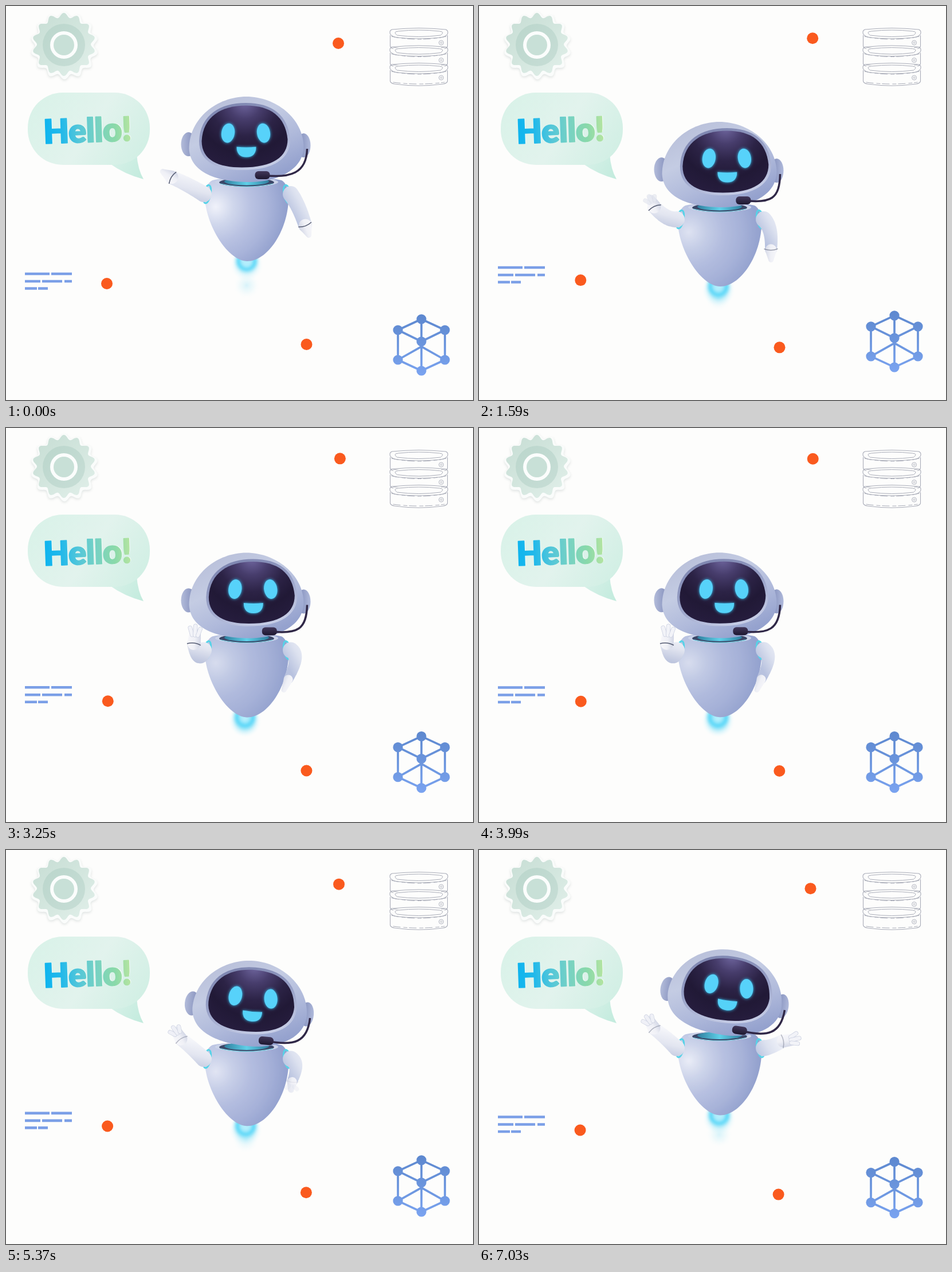
Animation, 815 px wide and 687 px high, one loop 7.13 s. Source, as an HTML page with a canvas:

```html
<!DOCTYPE html>
<html lang="en">
<head>
<meta charset="utf-8">
<title>Hello robot</title>
<style>
html, body { margin: 0; width: 100%; height: 100%; overflow: hidden; background: #fdfdfc; }
canvas { display: block; }
</style>
</head>
<body>
<canvas id="stage" width="815" height="687"></canvas>
<script>
const c = document.getElementById('stage').getContext('2d');
const LOOP = 7130, TAU = Math.PI * 2;

const clamp = v => Math.max(0, Math.min(1, v));
const mix = (a, b, u) => a.map((v, i) => v + (b[i] - v) * u);
function ramp(t, from, to) {
  const u = clamp((t - from) / (to - from));
  return u * u * (3 - 2 * u);
}

// Pose: elbow x, y, wrist x, y, hand x, y, finger spread, cuff line, wrist radius
const leftPoses = {
  wave: [320, 312, 290, 299, 269, 286, 0, 1, 12],
  bent: [337, 352, 328, 317, 332, 283, 1, 1, 12],
  spread: [327, 310, 306, 294, 291, 270, .9, .4, 11.5]
};
const rightPoses = {
  wave: [511, 347, 522, 382, 530, 404, 0, 1, 12],
  bent: [514, 337, 493, 378, 483, 402, 0, 0, 8.5],
  spread: [508, 327, 530, 316, 562, 311, 1, .4, 11.5]
};
const armAt = (poses, fold, unfold) => mix(mix(poses.wave, poses.bent, fold), poses.spread, unfold);

// The robot sinks, hangs, then rises part of the way; the icons share its sway.
function poseAt(t) {
  const body = 59.5 * Math.sin(Math.PI / 2 * clamp(t / 3000)) - 42 * ramp(t, 3900, 6650);
  const lean = ramp(t, 4400, 6100), drift = (t / LOOP) ** 4, fold = ramp(t, 1000, 2300);
  return {
    body,
    headX: 419.5 + 11.5 * lean,
    headY: 231 - 2 * lean + body,
    tilt: .14 * lean,
    faceX: -3 + 14 * ramp(t, 0, 1700) - 9 * ramp(t, 2500, 5200),
    sunk: body / 60,
    left: armAt(leftPoses, fold, ramp(t, 4050, 4800)),
    right: armAt(rightPoses, fold, ramp(t, 4800, 6950)),
    lines: 467 - .25 * body + 3 * drift,
    cube: 546 - .14 * body,
    dots: [
      [580 + .05 * body - 2.5 * drift, 65 - .2 * body + 6 * drift],
      [176 + .03 * body, 484 - .135 * body + 7.3 * drift],
      [524.5 - 2 * drift, 590 + .12 * body + 9 * drift]
    ]
  };
}

function stops(g, colors) {
  colors.forEach((color, i) => g.addColorStop(i / (colors.length - 1), color));
  return g;
}
const linear = (x0, y0, x1, y1, ...colors) => stops(c.createLinearGradient(x0, y0, x1, y1), colors);
const radial = (x, y, r, ...colors) => stops(c.createRadialGradient(x, y, 0, x, y, r), colors);

function fill(path, style) {
  c.fillStyle = style;
  c.fill(new Path2D(path));
}
function stroke(path, style, width) {
  c.strokeStyle = style;
  c.lineWidth = width;
  c.stroke(new Path2D(path));
}
function oval(x, y, rx, ry, style, turn = 0) {
  c.beginPath();
  c.ellipse(x, y, rx, ry, turn, 0, TAU);
  c.fillStyle = style;
  c.fill();
}
function ring(x, y, rx, ry, style, width, turn = 0) {
  c.beginPath();
  c.ellipse(x, y, rx, ry, turn, 0, TAU);
  c.strokeStyle = style;
  c.lineWidth = width;
  c.stroke();
}
function pill(x, y, w, h, r, style) {
  c.beginPath();
  c.roundRect(x, y, w, h, r);
  c.fillStyle = style;
  c.fill();
}
function placed(x, y, turn, draw) {
  c.save();
  c.translate(x, y);
  c.rotate(turn);
  draw();
  c.restore();
}

function cog(radius, depth) {
  const p = new Path2D();
  for (let i = 0; i <= 280; i++) {
    const a = i / 280 * TAU, r = radius + depth * Math.cos(14 * a);
    p.lineTo(r * Math.sin(a), -r * Math.cos(a));
  }
  return p;
}

function gear() {
  placed(102, 69, 0, () => {
    c.save();
    c.shadowColor = '#9aa8a64d';
    c.shadowBlur = 4;
    c.shadowOffsetY = 2;
    fill(cog(55, 4), '#fafcfb');
    c.restore();
    c.translate(-1, -2);
    fill(cog(51, 4), linear(-40, -45, 40, 45, '#c9dfd6', '#d3e6de', '#dfeee8'));
    oval(0, 1, 37, 37, linear(-30, -30, 30, 30, '#bcd7cd', '#c6ddd5'));
    oval(0, 1, 24, 24, '#fbfdfc');
    oval(0, 1, 18, 18, '#c8e0d7');
  });
}

function bubble() {
  fill('M180 274Q206 293 240 302Q230 285 228 258Z', linear(190, 270, 240, 300, '#d5f0e7', '#c2ebdd'));
  pill(38, 151, 213, 126, 61, linear(38, 151, 251, 290, '#d8f2e8', '#e2f3ed', '#cdeee2'));
  placed(66, 240, -.035, () => {
    c.font = '900 58px Lato, "Open Sans", sans-serif';
    c.letterSpacing = '-0.5px';
    c.lineJoin = 'round';
    c.fillStyle = '#f3fbf8';
    c.fillText('Hello!', 2, -1);
    c.fillStyle = c.strokeStyle = linear(0, 0, 156, 0,
      '#0db4ef', '#22b9ea', '#55c7d8', '#78d2c2', '#8ad9a9', '#bbe6a0');
    c.lineWidth = 2;
    c.fillText('Hello!', 0, 0);
    c.strokeText('Hello!', 0, 0);
  });
}

function database() {
  const ink = '#a9acb8';
  for (let i = 0; i < 3; i++) {
    placed(720.5, 48 + i * 30.5, 0, () => {
      fill('M-50 -3Q0 -15 50 -3V25Q49 28 45 28Q0 37 -45 28Q-50 27 -50 24Z', '#fdfdfc');
      stroke('M-47 -7Q0 -12 47 -7Q52 -5 50 1Q46 6 38 7Q0 11 -38 7Q-46 6 -50 1Q-52 -5 -47 -7Z', ink, 1.1);
      stroke('M-38 3Q-46 -3 -36 -4Q0 -8 36 -4Q46 -3 38 3Q0 8 -38 3Z', ink, 1);
      stroke('M-50 3V22Q-49 26 -42 27Q0 33 42 27Q49 26 50 22V3', ink, 1.1);
      c.setLineDash([13, 5, 7, 3]);
      stroke('M-48 5Q0 15 48 5M-45 24Q0 30 45 24', ink, 1);
      c.setLineDash([]);
      ring(39, 16, 4, 4, ink, .9);
      ring(39, 16, 1.5, 1.5, ink, .8);
    });
  }
}

function textLines(y) {
  const rows = ['M33 0H76M79 0H115', 'M33 13H60M63 13H98M102 13H115', 'M33 25.5H54M56 25.5H73'];
  placed(0, y, 0, () => stroke(rows.join(''), '#7b9fe7', 4.6));
}

function cube(y) {
  placed(725, y, 0, () => {
    const ink = linear(0, -8, 0, 98, '#5d88cf', '#6b95dd', '#7aa3f0');
    stroke('M0 0L-41 19V71L0 90L41 71V19ZV39M-41 19L0 39L41 19M-41 71L0 48L41 71M0 48V90', ink, 3.7);
    for (const v of [0, 39, 90]) oval(0, v, 8.6, 8.6, ink);
    for (const x of [-41, 41]) for (const v of [19, 71]) oval(x, v, 8.6, 8.6, ink);
  });
}

function flame({ body, sunk }) {
  const x = 420 - 3 * sunk, y = 443 + body, puff = 487 + body / 2;
  c.globalAlpha = .3;
  oval(x, puff, 24, 24, radial(x, puff, 24, '#7fdcf5', '#b5ebf890', '#ffffff00'));
  c.globalAlpha = .55 + .35 * sunk;
  oval(x, y + 8, 30, 30, radial(x, y + 8, 30, '#35cdf6', '#7fdff7a0', '#ffffff00'));
  c.globalAlpha = 1;
  c.save();
  c.filter = 'blur(3px)';
  ring(x, y + 1, 14, 14, '#54d6f8', 8);
  oval(x, y + 4, 9, 9, '#b4eefc');
  c.restore();
}

function torso({ body, sunk }) {
  placed(0, body, 0, () => {
    const shell = 'M360 304C352 308 347 318 347 335C350 385 388 445 421 445C455 445 490 395 493 340C494 318 488 308 481 304C460 298 380 298 360 304Z';
    fill(shell, radial(366, 350, 122, '#f0f2fa', '#d0d7ec', '#b9c2e2', '#a9b4da', '#93a1ce'));
    c.globalAlpha = .3 * sunk;
    fill(shell, '#9ca7d0');
    c.globalAlpha = 1;
    oval(420, 307, 55, 8, '#cbd3e9');
    oval(420, 307.5, 48, 7.5, '#3b4768');
    oval(420, 306, 39, 6.5, linear(381, 0, 459, 0, '#2f7f9f', '#5fd0e8', '#2f7f9f'));
    stroke('M374 310Q420 320 466 310', '#7fd9ea', 1.2);
  });
}

function head({ headX, headY, tilt, faceX }) {
  placed(headX, headY, tilt, () => {
    oval(-101, 10, 13, 21, linear(-114, 0, -94, 0, '#b3bcda', '#8a95c0'));
    oval(100, 12, 12, 21, linear(94, 0, 112, 0, '#8793bf', '#b0badb'));
    fill('M-100 18C-100 -36 -50 -73 0 -73C50 -73 100 -36 100 16C98 56 52 76 5 76C-50 76 -98 60 -100 18Z',
      linear(-45, -70, 25, 76, '#b9c0da', '#c4cce3', '#b0badb', '#95a2ce'));
    const screen = 'M-75 8C-73 -35 -40 -54 2 -54C45 -54 71 -35 75 5C75 35 50 54 -5 54C-45 54 -75 42 -75 8Z';
    placed(faceX, -3.5, 0, () => {
      stroke(screen, linear(-20, -56, 20, 58, '#8088b2', '#99a2c8', '#c6cde6'), 9);
      fill(screen, radial(0, -60, 118, '#7067a0', '#473d6c', '#2c2346', '#211936', '#261d3e'));
      c.save();
      c.shadowColor = '#38c8f8';
      c.shadowBlur = 5;
      oval(-29, -6, 11.5, 17, '#57d2fa', .16);
      oval(33, -6, 11.5, 17, '#57d2fa', -.16);
      fill('M-14 18Q3 20 20 18Q20 36 3 36Q-14 36 -14 18Z', '#55d2f8');
      c.restore();
    });
    const x = faceX + 31;
    stroke(`M${x} 64C${x + 50} 70 105 60 106 18`, '#302847', 3.5);
    pill(x - 13, 57, 26, 14, 6, linear(0, 57, 0, 71, '#41375a', '#1e1830'));
  });
}

// A tapering limb: overlapping circles along a bent line.
function limb(a, b, d, r0, r1, style) {
  const p = new Path2D();
  for (let i = 0; i <= 40; i++) {
    const u = i / 40, w = 1 - u;
    const x = w * w * a[0] + 2 * u * w * b[0] + u * u * d[0];
    const y = w * w * a[1] + 2 * u * w * b[1] + u * u * d[1];
    const r = r0 + (r1 - r0) * u;
    p.moveTo(x + r, y);
    p.arc(x, y, r, 0, TAU);
  }
  fill(p, style);
}

function hand(reach, open, radius) {
  const tone = linear(0, -10, 0, 11, '#f6f6fa', '#eff0f6', '#d3d7e6');
  limb([1, 0], [reach * .4, 0], [reach * (.8 - .3 * open), 0], radius - .5, 4.5 + 5.5 * open, tone);
  c.lineCap = 'round';
  c.globalAlpha = open;
  for (let i = -1; i <= 1; i++) {
    const finger = `M${reach * .45} ${i * 5}L${reach - 3 - Math.abs(i) * 4} ${i * 9 - 1}`;
    stroke(finger, '#cbd0e0', 7.5);
    stroke(finger, '#f2f3f8', 6);
  }
  c.globalAlpha = 1;
  c.lineCap = 'butt';
}

function arm(pose, y, side) {
  const [ex, ey, wx, wy, hx, hy, open, cuff, radius] = pose;
  const x = 421 + side * 69;
  placed(0, y, 0, () => {
    ring(x + side, 328, 6, 16, '#55d3e8', 3, side * -.2);
    const skin = side < 0
      ? linear(330, 295, 318, 345, '#f5f6fa', '#e2e5f0', '#bcc4dd')
      : linear(532, 325, 488, 350, '#f0f2f9', '#dce1ef', '#b8c2df');
    limb([x + side * 7, 328], [ex, ey], [wx, wy], 14, radius, skin);
    placed(wx, wy, Math.atan2(hy - wy, hx - wx), () => {
      hand(Math.hypot(hx - wx, hy - wy), open, radius);
      c.globalAlpha = cuff;
      stroke('M-1 -12Q4 0 -1 12', '#555c72', 1.6);
    });
  });
}

function draw(now) {
  const p = poseAt(now % LOOP);
  c.fillStyle = '#fdfdfc';
  c.fillRect(0, 0, 815, 687);
  gear();
  bubble();
  database();
  textLines(p.lines);
  cube(p.cube);
  for (const [x, y] of p.dots) oval(x, y, 10, 10, '#fa5a1e');
  flame(p);
  torso(p);
  arm(p.right, p.body, 1);
  head(p);
  arm(p.left, p.body, -1);
  requestAnimationFrame(draw);
}
requestAnimationFrame(draw);
</script>
</body>
</html>
```
